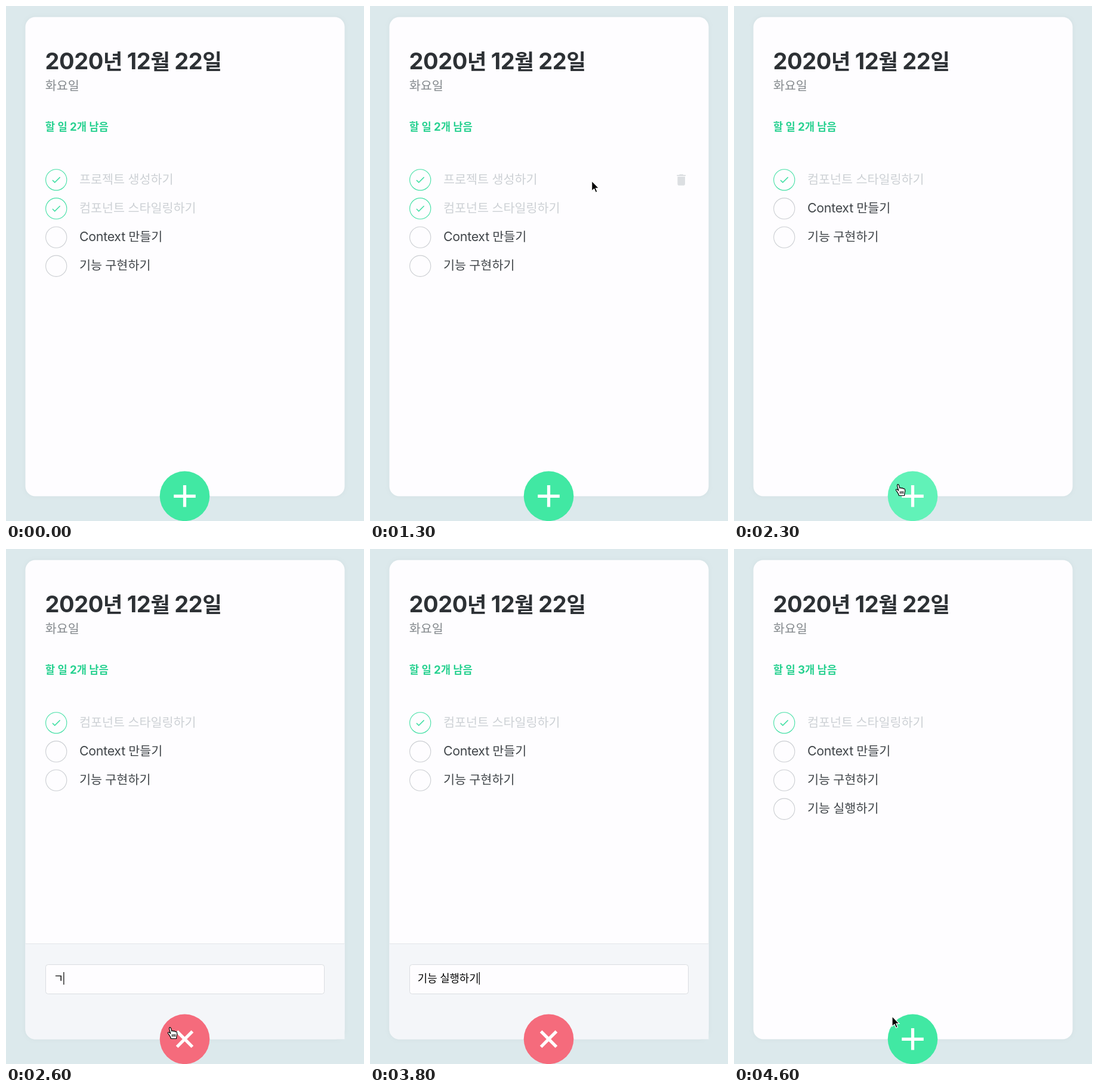
These frames come from a looping animation (600 px wide and 863 px high, 4900 ms). An HTML page:

```html
<!DOCTYPE html>
<html lang="ko">
<head>
<meta charset="utf-8">
<style>
  html, body { margin: 0; height: 100%; overflow: hidden; background: #dce9ec; }
  svg { display: block; }
  text { font: 21.4px Inter, "Noto Sans CJK KR", sans-serif; letter-spacing: -.013em; word-spacing: -.02em; white-space: pre; fill: #404549; }
  .ko { font-family: "Noto Sans CJK KR", "Noto Sans CJK JP", sans-serif; font-size: .967em; letter-spacing: 0; }
  .title { font-size: 38px; font-weight: 700; letter-spacing: -.012em; word-spacing: -.07em; fill: #2d3135; }
  .title .ko { font-size: .935em; }
  .day { fill: #84898d; }
  .left { font-size: 18.6px; font-weight: 700; letter-spacing: -.01em; word-spacing: -.035em; fill: #27d190; }
  .left .ko { font-size: .955em; }
  .done { fill: #cdd1d5; }
  .field { font-size: 18.4px; fill: #000; }
  .hint { fill: #757575; }
  .card { fill: #fefdff; filter: drop-shadow(0 0 4px rgba(0, 0, 0, .04)); }
</style>
</head>
<body>
<svg width="600" height="863" viewBox="0 0 600 863"></svg>
<script>
const svg = document.querySelector('svg');
const LOOP = 4900, STEP = 100;

const ICON = {
  check: 'M9 16.2L4.8 12l-1.4 1.4L9 19 21 7l-1.4-1.4z',
  trash: 'M6 19c0 1.1.9 2 2 2h8c1.1 0 2-.9 2-2V7H6zM19 4h-3.5l-1-1h-5l-1 1H5v2h14z',
  plus: 'M19 13h-6v6h-2v-6H5v-2h6V5h2v6h6z',
  arrow: 'M0 0V17L4 13.4 6.6 19.5 9.3 18.3 6.8 12.4H12z',
  hand: 'M6 19.5C5.5 16.5 4.5 15.5 3.2 13.7 2.2 12.2.4 10.6.9 9.4 1.6 8.3 3.2 8.7 4.2 10L5.2 11C4.6 8.5 3.8 6 3.2 3.6' +
    ' 2.8 1.6 3.4.8 4.3.7 5.3.6 5.8 1.2 6.2 2.8L7.3 7C7.7 6 9.5 5.9 9.9 7.2 10.6 6.3 12.4 6.5 12.8 8' +
    ' 13.8 7.2 15.6 7.8 16 9.4 16.6 12 16 13.6 15.5 15L15 19.5z'
};

// Pointer path: step, x, y of the hot spot
const PATH = [
  [1, 170, 840], [4, 95, 350], [6, 82, 289], [9, 82, 289], [12, 291, 292], [15, 533, 295],
  [18, 533, 295], [22, 285, 800], [23, 275, 802], [44, 275, 802], [46, 265, 783], [49, 265, 783]
];

const ADDED = '기능 실행하기';
const TYPED = `ㄱ|ㄱ|기|긴|기느|기능|기능|기능 |기능 시|기능 싫|기능 실행|기능 실행하|${ADDED}`.split('|');
const OPEN = 24, CLOSE = 39, TYPING = 26;

const clamp = v => Math.max(0, Math.min(1, v));
const mix = (a, b, k) => `rgb(${a.map((v, i) => Math.round(v + (b[i] - v) * k))})`;
const icon = (name, x, y, size, fill, turn = 0) =>
  `<path d="${ICON[name]}" fill="${fill}" transform="translate(${x} ${y}) rotate(${turn}) scale(${size / 24}) translate(-12 -12)"/>`;
const label = (text, x, y, cls = '') =>
  `<text class="${cls}" x="${x}" y="${y}">${text.replace(/[ ㄱ-ㅎ가-힣]+/g, '<tspan class="ko">$&</tspan>')}</text>`;

function pointerAt(step) {
  const i = PATH.findIndex(p => p[0] >= step);
  const b = PATH[i], a = PATH[Math.max(0, i - 1)];
  const k = b === a ? 0 : (step - a[0]) / (b[0] - a[0]);
  return {
    x: a[1] + (b[1] - a[1]) * k,
    y: a[2] + (b[2] - a[2]) * k,
    visible: step >= 1 && (step < 28 || step >= 43)
  };
}

function todosAt(step) {
  const list = [
    ['프로젝트 생성하기', step < 7 || step >= 10], ['컴포넌트 스타일링하기', true],
    ['Context 만들기', false], ['기능 구현하기', false]
  ];
  if (step >= 17) list.shift();
  if (step >= CLOSE) list.push([ADDED, false]);
  return list;
}

function row([text, done], i, p) {
  const y = 291.3 + i * 48.15;
  const hover = p.visible && Math.abs(p.y - y) < 24 && p.x > 66 && p.x < 536;
  const overTrash = hover && p.x > 509;
  p.hand ||= overTrash || hover && Math.hypot(p.x - 84, p.y - y) < 18;
  return `<circle cx="84.2" cy="${y}" r="17.6" fill="none" stroke="${done ? '#43e0a5' : '#cbced2'}" stroke-width="1.1"/>` +
    (done ? icon('check', 84.1, y, 18.8, '#43e0a5') : '') +
    label(text, 122.9, y + 6.7, done ? 'done' : '') +
    (hover ? icon('trash', 521.7, y, 25.1, overTrash ? '#f2475d' : '#dcdfe2') : '');
}

function form(step) {
  if (step < OPEN || step >= CLOSE) return '';
  const typed = step < TYPING ? '' : TYPED[Math.min(step - TYPING, TYPED.length - 1)];
  return `<path d="M32.5 661.3H567.5V821.5H49.2a16.7 16.7 0 0 1-16.7-16.7z" fill="#f4f6f9"/>
    <path d="M32.5 661.5H567.5" stroke="#e2e5e8"/>
    <rect x="66.5" y="696.5" width="467" height="49" rx="4" fill="#fefdff" stroke="#dadde1"/>` +
    (typed ? label(typed, 79.8, 726, 'field') : label('할 일을 입력 후, Enter 를 누르세요', 79.8, 726, 'field hint')) +
    '<path id="caret" d="M0 709V730" stroke="#000" stroke-width="1.2"/>';
}

function button(step, p) {
  const over = Math.hypot(p.x - 299.5, p.y - 821.3) < 42;
  p.hand ||= over;
  const k = clamp((step - OPEN) / 1.25) - clamp((step - CLOSE + .3) / 1.25);
  const green = over ? [97, 242, 184] : [65, 232, 163];
  return `<circle cx="299.5" cy="821.3" r="41.8" fill="${mix(green, [245, 107, 124], k)}"/>` +
    icon('plus', 299.5, 821.3, 62.7, '#fff', 45 * k);
}

function pointer(p) {
  if (!p.visible) return '';
  return p.hand
    ? `<g transform="translate(${p.x - 4.5} ${p.y - 1})" stroke="#000" stroke-width="1.2" stroke-linejoin="round">
        <path d="${ICON.hand}" fill="#fff"/><path d="M8 12.2V16.2M10.4 12V16.2M12.8 12V16.2"/></g>`
    : `<path d="${ICON.arrow}" transform="translate(${p.x} ${p.y})" stroke="#fff" stroke-width="1.2"/>`;
}

function draw(step) {
  const p = pointerAt(step), todos = todosAt(step);
  const left = todos.filter(([, done]) => !done).length;
  svg.innerHTML = '<rect class="card" x="32.5" y="18.5" width="535" height="803" rx="16.7"/>' +
    label('2020년 12월 22일', 65.5, 106.2, 'title') +
    label('화요일', 65.8, 141, 'day') +
    label(`할 일 ${left}개 남음`, 65.8, 208.7, 'left') +
    todos.map((todo, i) => row(todo, i, p)).join('') +
    form(step) + button(step, p) + pointer(p);

  const caret = document.getElementById('caret');
  if (caret) {
    const field = svg.querySelector('.field');
    const width = step < TYPING ? 0 : field.getComputedTextLength();
    caret.setAttribute('transform', `translate(${80.5 + width} 0)`);
  }
}

let shown = -1;
const start = performance.now();
function tick() {
  const step = Math.floor((performance.now() - start) % LOOP / STEP);
  if (step !== shown) draw(shown = step);
  requestAnimationFrame(tick);
}
tick();
</script>
</body>
</html>
```
